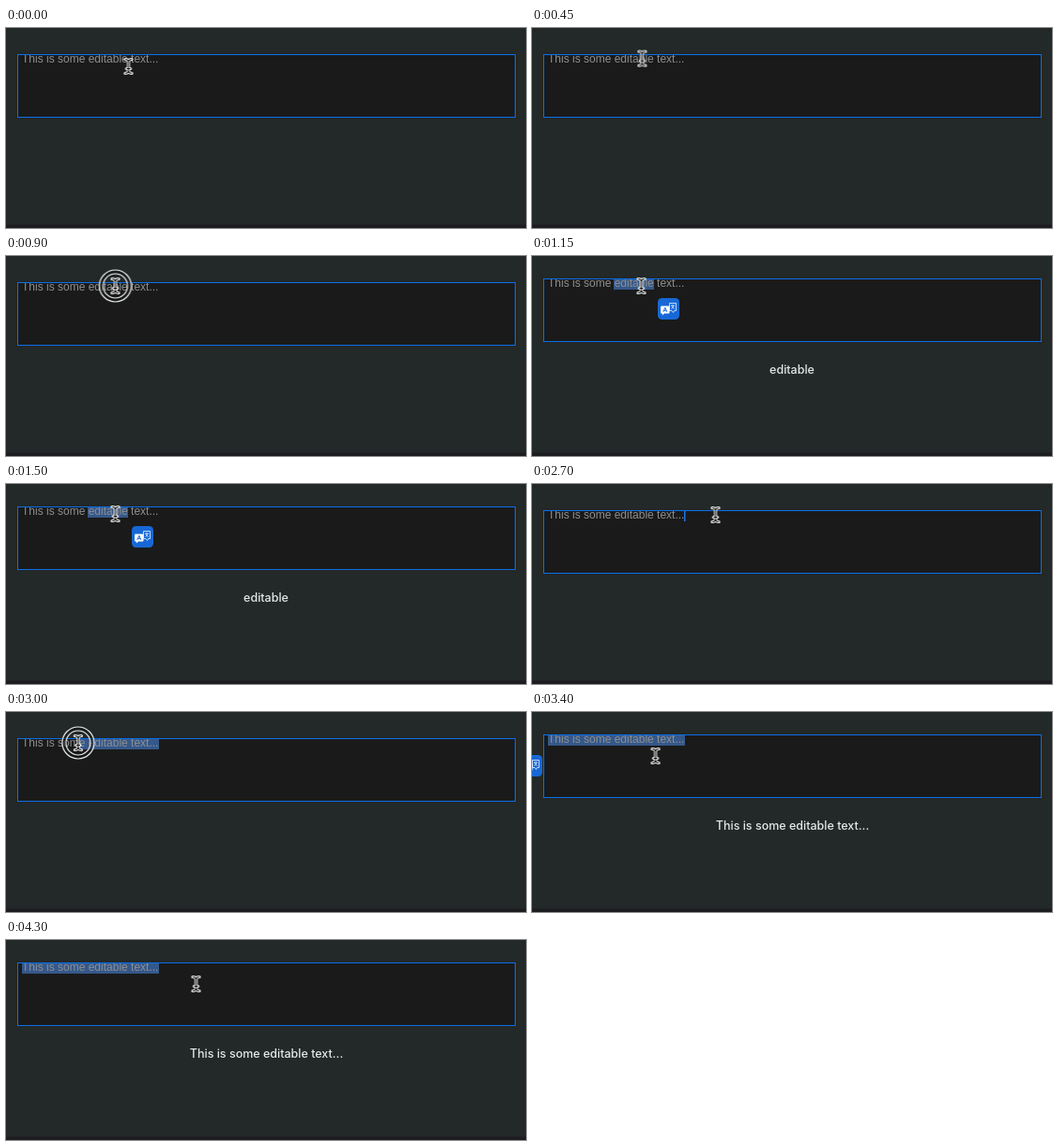
An HTML page that plays this animation: 554 by 214 pixels, repeating every 4.35 s.

```html
<!DOCTYPE html>
<html lang="en">
<head>
<meta charset="utf-8">
<title>Select to translate</title>
<style>
  html, body { margin: 0; width: 100%; height: 100%; overflow: hidden; background: #232828; }
  svg { display: block; width: 554px; height: 214px; }
  .field { font: 12px "Liberation Sans", Arial, sans-serif; fill: #8d8f90; }
  .result { font: 500 12.5px Inter, Roboto, sans-serif; fill: #e6e8e8; text-anchor: middle; }
  .mark { fill: #35588a; }

  /* every track shares one 4350 ms loop */
  .box, .word, .all, .caret, .first, .second, .btn1, .btn2, .rings, .cursor {
    animation: 4350ms step-end infinite;
  }
  .box { animation-name: lift; }
  .word { animation-name: word; }
  .all { animation-name: all; animation-timing-function: linear; transform-origin: 163px 0; }
  .caret { animation-name: caret; }
  .first { animation-name: first; }
  .second { animation-name: second; }
  .btn1 { animation-name: btn1; }
  .btn2 { animation-name: btn2; }
  .rings { animation-name: rings; }
  .cursor { animation-name: move; animation-timing-function: ease-in-out; }

  @keyframes lift {
    0%, 55.17%, 100% { transform: none; }
    26.43%, 74.7% { transform: translateY(-4px); }
  }
  @keyframes word {
    0%, 55.17%, 100% { opacity: 0; }
    21.83% { opacity: 1; }
  }
  @keyframes all {
    0%, 65.33% { transform: scaleX(0); }
    71.54%, 100% { transform: scaleX(1); }
  }
  @keyframes caret {
    0%, 65.33%, 100% { opacity: 0; }
    55.17% { opacity: 1; }
  }
  @keyframes first {
    0%, 55.17%, 100% { opacity: 0; }
    26.43% { opacity: 1; }
  }
  @keyframes second {
    0% { opacity: 0; }
    74.7%, 100% { opacity: 1; }
  }
  @keyframes btn1 {
    0%, 43.67%, 100% { opacity: 0; }
    26.43% { opacity: 1; }
  }
  @keyframes btn2 {
    0%, 79.3%, 100% { opacity: 0; }
    74.7% { opacity: 1; }
  }
  @keyframes rings {
    0%, 18.38%, 25.28%, 58.61%, 73.55%, 100% { opacity: 0; }
    16.08%, 19.53%, 55.17%, 63.91% { opacity: 1; }
  }
  @keyframes move {
    0% { transform: translate(130.5px, 41px); }
    12.64%, 37.93% { transform: translate(116.5px, 32px); }
    43.68% { transform: translate(34px, 32px); }
    48.28%, 51.72% { transform: translate(60.5px, 32px); }
    55.17% { transform: translate(195.5px, 33px); }
    63.91% { transform: translate(195.5px, 33px); animation-timing-function: linear; }
    73.56%, 74.71% { transform: translate(-30px, 33px); }
    78.16% { transform: translate(131.5px, 47px); }
    86.21%, 96.55% { transform: translate(166.5px, 47px); }
    98.85%, 100% { transform: translate(202.5px, 47px); }
  }
</style>
</head>
<body>
<svg viewBox="0 0 554 214">
  <defs>
    <path id="beam" d="M-3.5-7.5Q-.6-7.5 0-5.2Q.6-7.5 3.5-7.5M0-5.2V5.2M-3.5 7.5Q-.6 7.5 0 5.2Q.6 7.5 3.5 7.5M-2 2.5H2"/>
    <g id="button">
      <rect width="23" height="23" rx="4.5" fill="#1768d6"/>
      <path d="M12.5 5.5H19.5V13.5H17.5L16.5 15.5L15 13.5H12.5Z" fill="none" stroke="#d5e5fb" stroke-width=".9" stroke-linejoin="round"/>
      <path d="M14 8H18M16 7V8M17.3 8L14.5 11.8M14.7 8L17.6 11.8" fill="none" stroke="#d5e5fb" stroke-width=".8"/>
      <path d="M4 8.5H11.5Q12.5 8.5 12.5 9.5V15.5Q12.5 16.5 11.5 16.5H7L4.8 18.5V16.5H4Q3 16.5 3 15.5V9.5Q3 8.5 4 8.5Z" fill="#fff"/>
      <path d="M5.8 14.8L7.8 10.2L9.8 14.8M6.5 13.3H9.1" fill="none" stroke="#1768d6"/>
    </g>
  </defs>

  <rect width="554" height="214" fill="#232828"/>
  <rect y="210.5" width="554" height="3.5" fill="#1d1c21"/>

  <g class="box">
    <rect x="12" y="28" width="531" height="68" fill="#1a1a1a"/>
    <rect class="mark word" x="87" y="28" width="43" height="12"/>
    <rect class="mark all" x="17" y="28" width="146" height="12"/>
    <text class="field" x="17" y="37.2">This is some editable text...</text>
    <rect class="caret" x="162" y="28" width="1.5" height="12" fill="#1d74e8"/>
    <rect x="12.5" y="28.5" width="530" height="67" fill="none" stroke="#0a70ea"/>
  </g>

  <text class="result first" x="277" y="126">editable</text>
  <text class="result second" x="277.5" y="126">This is some editable text...</text>

  <g class="btn1"><use href="#button" x="134" y="45"/></g>
  <g class="btn2"><use href="#button" x="-12" y="46"/></g>

  <g class="cursor" fill="none">
    <g class="rings">
      <circle r="15" stroke="#111616" stroke-width="4" opacity=".6"/>
      <circle r="17" stroke="#f2f2f2" stroke-width="1.2"/>
      <circle r="13" stroke="#f2f2f2" stroke-width="1.2"/>
    </g>
    <use href="#beam" stroke="#f4f4f4" stroke-width="3.2" stroke-linecap="round"/>
    <use href="#beam" stroke="#101010" stroke-width="1.1"/>
  </g>
</svg>
</body>
</html>
```
